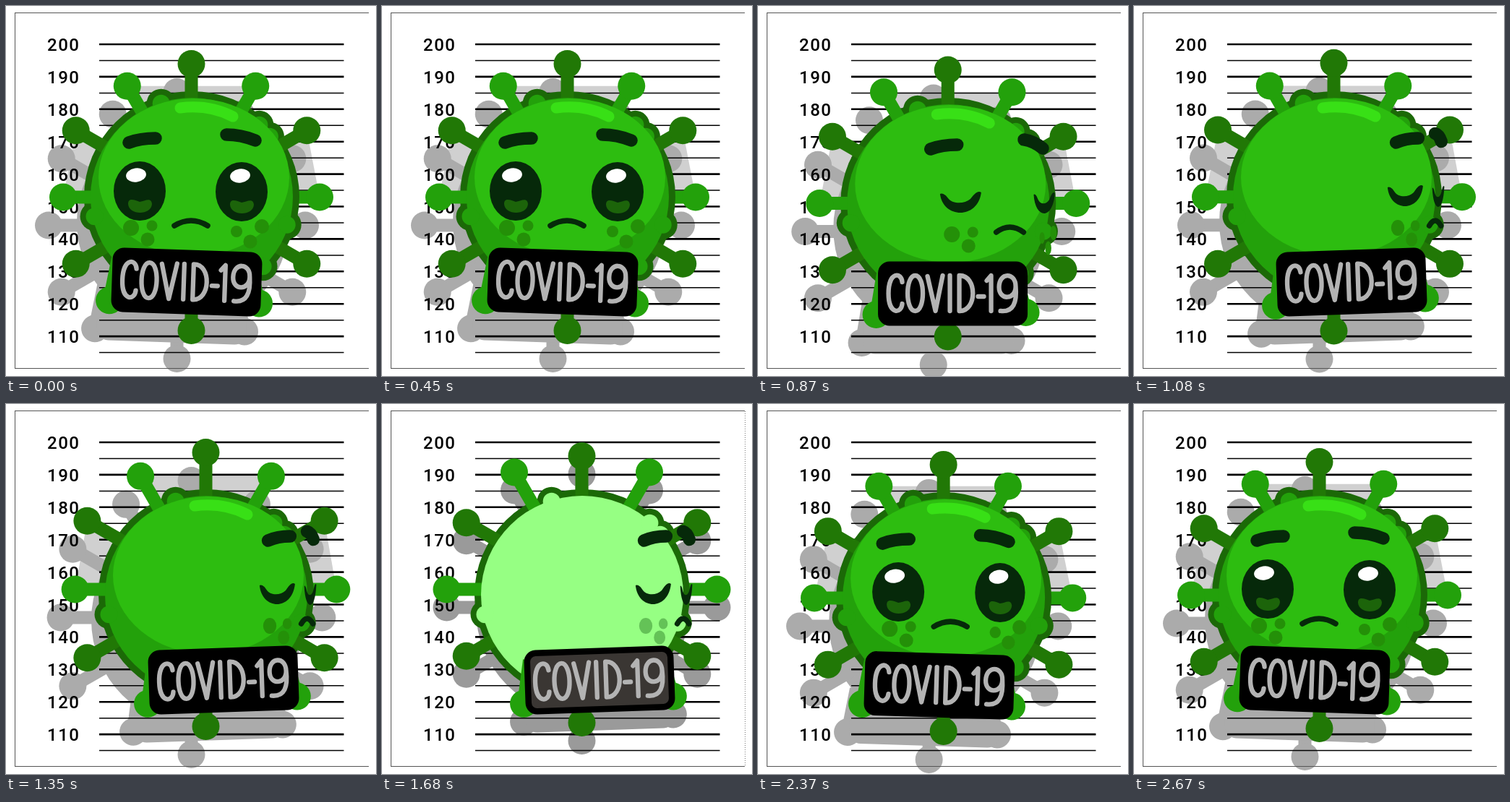
An HTML page with a canvas that plays this animation: 512x512 px, repeating every 2.7 s.

```html
<!DOCTYPE html>
<html lang="en">
<head>
<meta charset="utf-8">
<title>COVID-19 mugshot</title>
<style>
html, body { margin: 0; width: 100%; height: 100%; overflow: hidden; background: #fff; }
canvas { display: block; width: 512px; height: 512px; }
</style>
</head>
<body>
<canvas id="stage" width="512" height="512" role="img" aria-label="Height chart, virus holding a COVID-19 sign"></canvas>
<script>
const ctx = document.getElementById('stage').getContext('2d');
const LOOP = 2700, TAU = Math.PI * 2, DEG = Math.PI / 180;
const C = {
  outline: '#1b6907', dark: '#217806', mid: '#23a10b', bright: '#2dbd10',
  shine: '#38e016', flash: '#96ff83', ink: '#06290a', iris: '#1c640a'
};

const LETTERS = new Path2D(
  'M-70-16C-71-30-89-31-89 0C-89 30-71 28-70 14' +
  'M-52-25C-38-25-38 24-52 24C-66 24-66-25-52-25Z' +
  'M-35-24L-24 24L-14-25M-4-25V24' +
  'M9-25V24C34 25 34-26 9-25ZM35 4H43M47-18L53-25V24' +
  'M87-10C87-30 64-30 64-9C64 10 87 9 87-10C89 12 84 26 66 24');
const LID = new Path2D('M-28-10C-24 24 24 26 29-12C24-16 18-8 14-3C6 4-10 4-16-3C-20-9-25-12-28-10Z');
const BROW_L = new Path2D('M-18 4Q-2-2 19-2');
const BROW_R = new Path2D('M-20-4Q0-4 20 4');
const MOUTH = new Path2D('M-23 5Q0-9 23 5');
const IRIS = new Path2D('M-16 18C-16 8-6 13 0 15C7 14 16 8 17 18C16 34-15 34-16 18Z');
const SHINE = new Path2D('M241 141Q281 136 314 153');

const ramp = (t, a, b) => Math.max(0, Math.min(1, (t - a) / (b - a)));
const swing = u => (1 - Math.cos(Math.PI * u)) / 2;
const arc = u => Math.sin(Math.PI * u);

function poseAt(t) {
  const out = ramp(t, 690, 1050), back = ramp(t, 2040, 2430);
  const turn = swing(out) - swing(back);
  const dip = arc(out) + arc(back);
  const lift = swing(ramp(t, 1050, 1290)) - swing(ramp(t, 1740, 2040));
  const stretch = ramp(t, 1170, 1950) - swing(ramp(t, 2100, 2430));
  const bx = 20 * turn ** 1.7;
  return {
    turn, bx, by: 9 * dip,
    sx: 256.5 + bx, sy: 264.5 + 8.5 * dip - 8 * lift,
    light: 177.5 + 14.5 * stretch,
    dark: 184.5 + 5 * arc(ramp(t, 1050, 1650)),
    px: 250 + 51 * turn ** 1.4, py: 382 + 16 * dip,
    angle: (2 - 4 * turn) * DEG,
    open: 1 - ramp(t, 720, 810) + ramp(t, 1950, 2040),
    lit: (t >= 510 && t < 600) || (t >= 1650 && t < 1740)
  };
}

function oval(x, y, rx, ry, color, tilt = 0) {
  ctx.fillStyle = color;
  ctx.beginPath();
  ctx.ellipse(x, y, rx, ry, tilt, 0, TAU);
  ctx.fill();
}
const disc = (x, y, r, color) => oval(x, y, r, r, color);

function line(x1, y1, x2, y2, width, color) {
  ctx.strokeStyle = color;
  ctx.lineWidth = width;
  ctx.beginPath();
  ctx.moveTo(x1, y1);
  ctx.lineTo(x2, y2);
  ctx.stroke();
}

function trace(path, width, color) {
  ctx.strokeStyle = color;
  ctx.lineWidth = width;
  ctx.stroke(path);
}

function fill(path, color) {
  ctx.fillStyle = color;
  ctx.fill(path);
}

function at(x, y, draw, tilt = 0) {
  ctx.save();
  ctx.translate(x, y);
  ctx.rotate(tilt);
  draw();
  ctx.restore();
}

// twelve places like a clock face: odd ones light, even ones dark
function spikeTip(s, k) {
  const r = k % 2 ? s.light : s.dark;
  return [s.sx + Math.sin(k * TAU / 12) * r, s.sy - Math.cos(k * TAU / 12) * r];
}

function spike(s, k, color = k % 2 ? C.mid : C.dark) {
  const [x, y] = spikeTip(s, k);
  line(s.sx + (x - s.sx) * 0.6, s.sy + (y - s.sy) * 0.6, x, y, 18, color);
  disc(x, y, 19, color);
}

// the sign hides 5 and 7; 3 lies behind the body
function spikes(s, color) {
  for (let k = 0; k < 12; k++) if (![3, 5, 7].includes(k)) spike(s, k, color);
}

function hands(s, color) {
  at(s.px, s.py, () => {
    for (const [x, y, lean] of [[-106, 29, 10], [101, 26, -16]]) {
      line(x, y, x + lean, y - 60, 18, color);
      disc(x, y, 19, color);
    }
  }, s.angle);
}

function plate(inset, color) {
  ctx.fillStyle = color;
  ctx.beginPath();
  ctx.roundRect(inset - 103.5, inset - 44.5, 207 - 2 * inset, 89 - 2 * inset, 16 - inset);
  ctx.fill();
}

function sign(s) {
  at(s.px, s.py, () => {
    plate(0, '#000');
    if (s.lit) plate(8.5, '#3a3633');
    trace(LETTERS, 6.3, '#b3b3b3');
  }, s.angle);
}

function web(s, from, to) {
  ctx.fillStyle = '#d0d0d0';
  ctx.beginPath();
  ctx.moveTo(s.sx, s.sy);
  ctx.lineTo(...spikeTip(s, from));
  ctx.lineTo(...spikeTip(s, to));
  ctx.fill();
}

function shadow(s) {
  const color = s.lit ? '#9a9a9a' : '#ababab';
  if (!s.lit) {
    web(s, 11, 1);
    web(s, 2, 3);
    web(s, 9, 10);
  }
  at(s.lit ? 0 : -20, s.lit ? 25 : 39, () => {
    disc((s.lit ? 257 : 265) + s.bx, 260 + s.by, 147, color);
    spikes(s, color);
    spike(s, 3, color);
    hands(s, color);
    at(s.px, s.py, () => plate(0, color), s.angle);
  });
}

function chart(lit) {
  line(12.5, 9, 12.5, 502, 1, '#555');
  line(12, 9.5, 502, 9.5, 1, '#555');
  line(12, 501.5, 502, 501.5, 1, '#555');
  if (lit) {
    ctx.setLineDash([1, 2]);
    line(502.5, 10, 502.5, 501, 1, '#777');
    ctx.setLineDash([]);
  }
  ctx.fillStyle = '#000';
  ctx.font = '500 24px Roboto, Arial, sans-serif';
  ctx.letterSpacing = '1.5px';
  for (let i = 0; i < 10; i++) {
    const y = 53 + i * 44.9;
    ctx.fillText(200 - i * 10, 57, y + 9);
    line(129, y, 467.5, y, 2.6, '#000');
    line(129, y + 22.5, 467.5, y + 22.5, 1.5, '#000');
  }
}

function bumps(r, color) {
  for (const a of [-18, 43, 52, 106, 134, 259]) {
    disc(257 + 137 * Math.sin(a * DEG), 265 - 137 * Math.cos(a * DEG), r, color);
  }
}

function body(s) {
  spike(s, 3);
  at(s.bx, s.by, () => {
    oval(257, 264, 149, 146, C.outline);
    bumps(20, C.outline);
  });
  spikes(s);
  at(s.bx, s.by, () => {
    const skin = s.lit ? C.flash : C.mid;
    oval(257, 264, 140, 137, skin);
    bumps(12, skin);
    if (s.lit) return;
    oval(260, 237, 132, 109, C.bright);
    ctx.lineCap = 'round';
    trace(SHINE, 15, C.shine);
    ctx.lineCap = 'butt';
  });
}

// slides a feature round the ball, narrowing it towards the edge
function feature(s, x, y, draw, { lag = 1, limit = 75, tilt = 0 } = {}) {
  const rest = Math.asin((x - 257) / 149);
  const a = Math.min(rest + 70 * DEG * s.turn ** lag, Math.max(limit * DEG, rest));
  const w = Math.max(0.001, Math.min(1, Math.cos(a) / Math.cos(rest)));
  at(257 + 149 * Math.sin(a), y, () => draw(w), tilt * s.turn);
}

// narrows the path but keeps the line weight
function stroke(path, width) {
  return w => {
    const narrow = new Path2D();
    narrow.addPath(path, new DOMMatrix([w, 0, 0, 1, 0, 0]));
    trace(narrow, width, C.ink);
  };
}

function eye(open, shineX) {
  return w => {
    ctx.scale(w, 1);
    if (open < 0.3) {
      ctx.translate(0, 5);
      fill(LID, C.ink);
      return;
    }
    ctx.scale(1, open);
    oval(0, 0, 36, 41, C.ink);
    oval(shineX, -22, 14, 9.5, '#fff', -0.15);
    fill(IRIS, C.iris);
  };
}

function freckles(lit, spots) {
  return w => {
    for (const [x, y, r] of spots) oval(x * w, y, r * w, r, lit ? '#64c257' : '#249008');
  };
}

function face(s) {
  at(s.bx, s.by, () => {
    feature(s, 188, 311, freckles(s.lit, [[-15, -4, 11], [14, -7, 7.5], [8, 12, 9.5]]));
    feature(s, 337, 314, freckles(s.lit, [[17, -9, 10], [-18, -2, 8], [1, 12, 9.5]]), { limit: 90 });
    feature(s, 185, 256, eye(s.open, -5));
    feature(s, 326, 257, eye(s.open, -2));
    feature(s, 188, 185, stroke(BROW_L, 17.5), { lag: 1.5 });
    feature(s, 325, 182, stroke(BROW_R, 17.5), { lag: 1.5, tilt: 0.3 });
    feature(s, 256, 299, stroke(MOUTH, 7.5));
  });
}

function render(t) {
  const s = poseAt(t);
  ctx.fillStyle = '#fff';
  ctx.fillRect(0, 0, 512, 512);
  ctx.lineCap = 'butt';
  shadow(s);
  chart(s.lit);
  body(s);
  hands(s, C.mid);
  ctx.lineCap = ctx.lineJoin = 'round';
  face(s);
  sign(s);
}

const start = performance.now();
function tick() {
  render((performance.now() - start) % LOOP);
  requestAnimationFrame(tick);
}
render(0);
requestAnimationFrame(tick);
</script>
</body>
</html>
```
